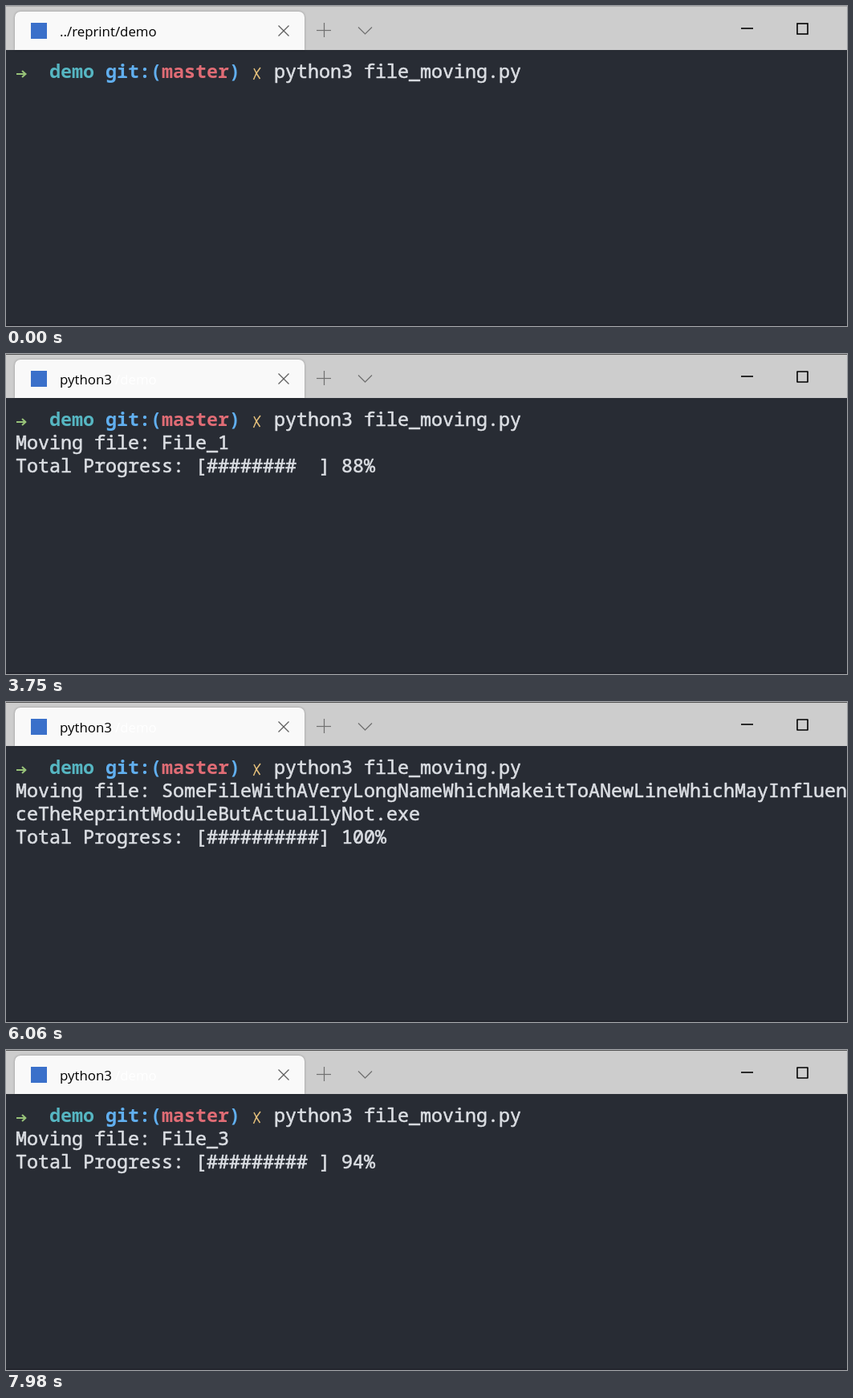
An HTML page with a canvas that plays this animation: 1048 px wide and 400 px high, repeating every 8000 ms.

```html
<!DOCTYPE html>
<html lang="en">
<head>
<meta charset="utf-8">
<title>Terminal progress</title>
<style>
  html, body { margin: 0; width: 100%; height: 100%; overflow: hidden; background: #282c34; }
  canvas { display: block; }
</style>
</head>
<body>
<canvas id="stage" width="1048" height="400"></canvas>
<script>
const ctx = document.getElementById('stage').getContext('2d');

const LOOP = 8000;
const FOCUS = 570, ENTER = 1800, FIRST_LINE = 1905, FIRST_BAR = 1950;
const BLINK = 540, BLINK_RUNNING = 534;
const STEP = 20.15, WRAP_DELAY = 36;
const LEFT = 12, TOP = 67, CELL = 14, ROW = 29, COLUMNS = 74;

const COLORS = {
  back: '#282c34', text: '#dcdfe4', green: '#98c379', cyan: '#56b6c2',
  blue: '#61afef', red: '#e06c75', yellow: '#e5c07b'
};
const COMMAND = 'python3 file_moving.py';
const COMMAND_COL = 23;
const LONG_NAME = 'SomeFileWithAVeryLongNameWhichMakeitToANewLine'
  + 'WhichMayInfluenceTheReprintModuleButActuallyNot.exe';

// Every file counts from 0 to 100 percent; a wrapped name slows it down a little.
let nextStart = 1969;
const files = ['File_1', LONG_NAME, 'File_3'].map(name => {
  const title = 'Moving file: ' + name;
  const start = nextStart;
  nextStart += 101 * STEP + (title.length > COLUMNS ? WRAP_DELAY : 0);
  return { title, start };
});

function rect(x, y, w, h, color) {
  ctx.fillStyle = color;
  ctx.fillRect(x, y, w, h);
}

function line(color, width, ...points) {
  ctx.strokeStyle = color;
  ctx.lineWidth = width;
  ctx.beginPath();
  points.forEach(([x, y]) => ctx.lineTo(x, y));
  ctx.stroke();
}

// Terminal text sits on a fixed character grid; a hairline outline gives it a medium weight.
function print(text, col, row, color = COLORS.text, weight = 400) {
  ctx.font = weight + ' 23.333px "Noto Sans Mono", monospace';
  ctx.fillStyle = ctx.strokeStyle = color;
  ctx.lineWidth = 0.55;
  ctx.lineJoin = 'round';
  [...text].forEach((ch, i) => {
    const x = LEFT + (col + i) * CELL, y = TOP + row * ROW + 23;
    ctx.fillText(ch, x, y);
    if (weight < 600) ctx.strokeText(ch, x, y);
  });
  return col + text.length;
}

function printWrapped(text, row) {
  for (let i = 0; i < text.length; i += COLUMNS) {
    print(text.slice(i, i + COLUMNS), 0, row++);
  }
  return row;
}

function label(text, x, color) {
  ctx.font = '16.85px "Open Sans", sans-serif';
  ctx.fillStyle = color;
  ctx.fillText(text, x, 38);
}

function drawTab(t) {
  ctx.save();
  ctx.shadowColor = 'rgba(0, 0, 0, 0.3)';
  ctx.shadowBlur = 3;
  ctx.fillStyle = '#f9f9f9';
  ctx.beginPath();
  ctx.roundRect(11, 7, 361, 48, [7, 7, 0, 0]);
  ctx.fill();
  ctx.restore();

  rect(31, 21, 20, 20, '#3a70ca');
  if (t < ENTER) {
    label('../reprint/demo', 67, '#000000');
  } else {
    label('/demo', 136, '#ffffff');
    label('python3', 67, '#000000');
  }
}

function drawTitleBar(t) {
  rect(0, 0, 1048, 55, '#cdcdcd');
  rect(0, 0, 1048, 1, t < FOCUS ? '#aaaaaa' : '#555555');
  drawTab(t);

  const close = '#606060', button = '#707070';
  line(close, 1.2, [339.5, 24.5], [352.5, 37.5]);
  line(close, 1.2, [352.5, 24.5], [339.5, 37.5]);
  line(button, 1.2, [387, 30.5], [405, 30.5]);
  line(button, 1.2, [396.5, 21], [396.5, 39]);
  line(button, 1.2, [439, 26.5], [447.5, 35], [456, 26.5]);

  line('#000000', 1.6, [916, 28], [931, 28]);
  ctx.strokeRect(986, 22, 13, 13);
}

function drawPrompt() {
  line(COLORS.green, 2, [13, 85], [24, 85]);
  line(COLORS.green, 2, [20, 81], [24.5, 85], [20, 89]);

  let col = print('demo ', 3, 0, COLORS.cyan, 600);
  col = print('git:(', col, 0, COLORS.blue, 600);
  col = print('master', col, 0, COLORS.red, 600);
  print(')', col, 0, COLORS.blue, 600);

  line(COLORS.yellow, 1.5, [309, 78], [312, 84], [316.5, 91]);
  line(COLORS.yellow, 1.5, [317, 77], [312, 84], [308.5, 92]);
  print(COMMAND, COMMAND_COL, 0);
}

function drawOutput(t) {
  if (t < FIRST_LINE) return;
  const file = files.findLast(f => t >= f.start) || files[0];
  const row = printWrapped(file.title, 1);
  if (t < FIRST_BAR) return;
  const percent = Math.min(100, Math.max(0, Math.floor((t - file.start) / STEP)));
  const bar = '#'.repeat(Math.floor(percent / 10)).padEnd(10);
  print(`Total Progress: [${bar}] ${percent}%`, 0, row);
}

function drawCursor(t) {
  if (t < FOCUS) return;
  const running = t >= ENTER;
  const phase = running ? (t - ENTER) / BLINK_RUNNING : (t - FOCUS) / BLINK;
  if (Math.floor(phase) % 2) return;
  const col = running ? 0 : COMMAND_COL + COMMAND.length;
  rect(LEFT + col * CELL, TOP + (running ? ROW : 0), 1, ROW, '#ffffff');
}

function draw(t) {
  rect(0, 0, 1048, 400, COLORS.back);
  rect(0, 398, 1048, 2, '#23262e');
  drawTitleBar(t);
  drawPrompt();
  drawOutput(t);
  drawCursor(t);
}

let origin;
function tick(now) {
  origin ??= now;
  draw((now - origin) % LOOP);
  requestAnimationFrame(tick);
}
requestAnimationFrame(tick);
</script>
</body>
</html>
```
